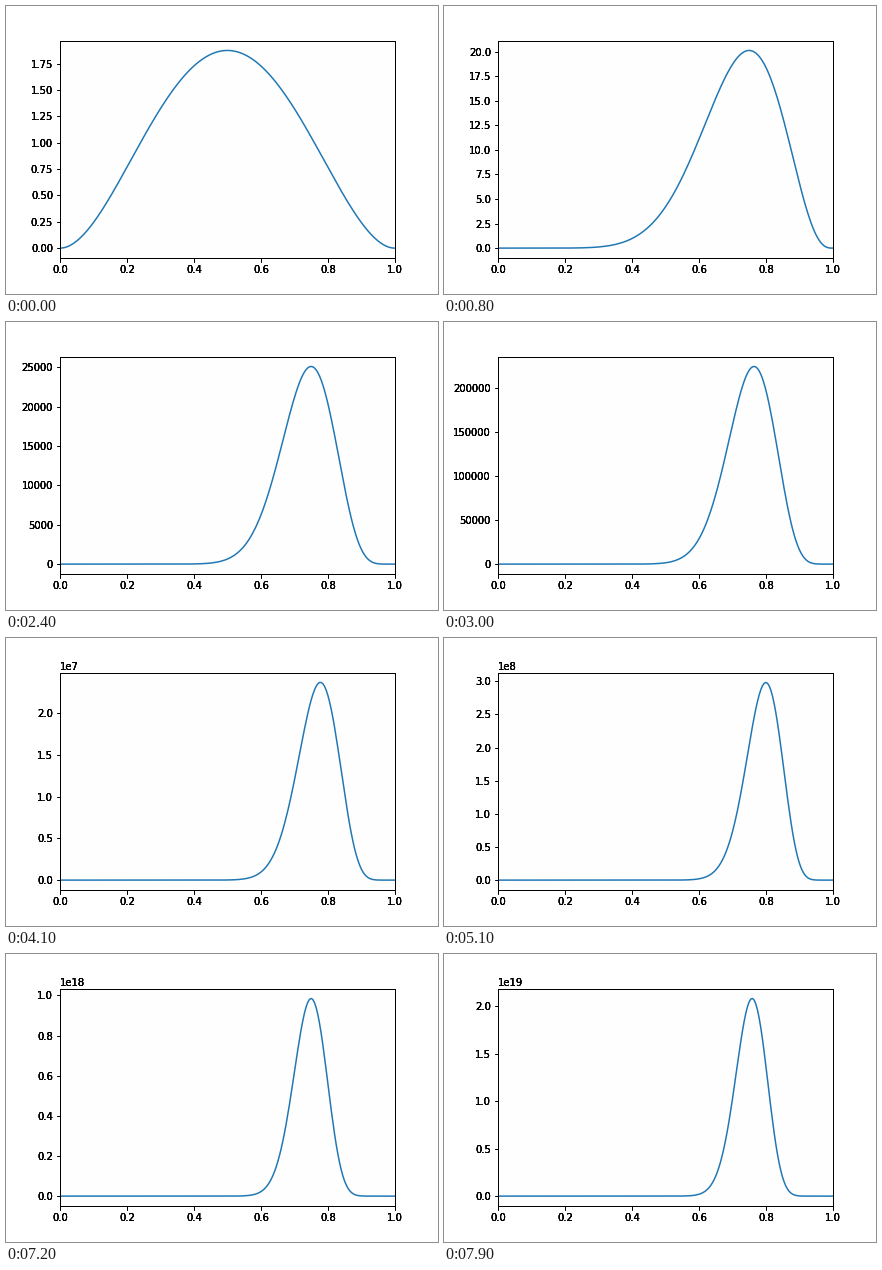
Recreate the animation shown at these times as a matplotlib script. Size 432 by 288 pixels, loop 8000 ms.

```python
from math import gamma

import numpy as np
import matplotlib.pyplot as plt
from matplotlib.animation import FuncAnimation
from matplotlib.axes import Axes

FRAMES = 80
PRIOR = 3
# Tosses that come up tails; all others are heads.
TAILS = {5, 11, 20, 22, 24, 28, 33, 36, 42, 53, 54, 55, 57, 59, 61, 62, 69, 75}

plt.rcParams["font.family"] = "DejaVu Sans"
plt.rcParams["font.size"] = 10


class InkedAxes(Axes):
    """Axes whose labels, ticks and frame are overprinted to solid black."""

    def draw(self, renderer):
        super().draw(renderer)
        for _ in range(3):
            for part in (self.xaxis, self.yaxis, *self.spines.values()):
                part.draw(renderer)


def belief(x, a, b):
    scale = gamma(a + b) / (gamma(a) + gamma(b))
    return scale * x ** (a - 1) * (1 - x) ** (b - 1)


fig = plt.figure(figsize=(6, 4), dpi=72, facecolor="white")
ax = InkedAxes(fig, [0.125, 0.125, 0.775, 0.755], facecolor="#fefefe")
fig.add_axes(ax)
ax.set_xlim(0, 1)

x = np.linspace(0, 1, 201)
line, = ax.plot(x, belief(x, PRIOR, PRIOR), color="#1f77b4", lw=1.5)


def update(toss):
    tails = sum(t <= toss for t in TAILS)
    y = belief(x, PRIOR + toss - tails, PRIOR + tails)
    line.set_ydata(y)
    ax.set_ylim(-0.05 * y.max(), 1.05 * y.max())
    return line,


anim = FuncAnimation(fig, update, frames=FRAMES, interval=100,
                     repeat=True, repeat_delay=0, blit=False)
plt.show()
```
